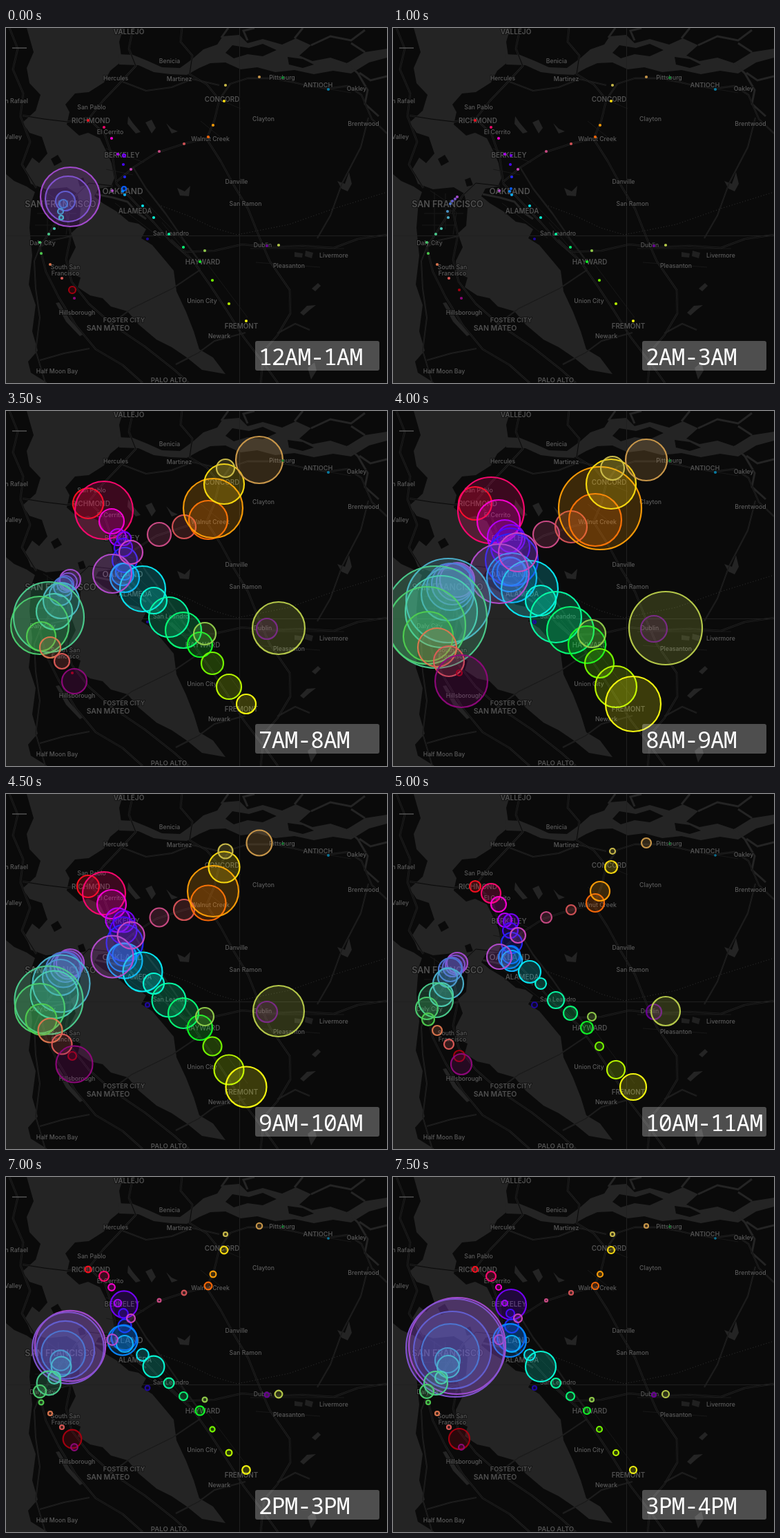
Recreate the animation shown at these times as an HTML page with a canvas. Size 552 by 515 pixels, loop 8 s.

```html
<!DOCTYPE html>
<html lang="en">
<head>
<meta charset="utf-8">
<title>Bay Area station activity by hour</title>
<style>
  html, body { margin: 0; width: 552px; height: 515px; overflow: hidden; background: #0a0a0a; }
  canvas { display: block; }
</style>
</head>
<body>
<canvas id="stage" width="552" height="515"></canvas>
<script>
const W = 552, H = 515, HOUR_MS = 500, HOURS = 16;
const LAND = '#0a0a0a', WATER = '#242424';
const ctx = document.getElementById('stage').getContext('2d');
const map = document.createElement('canvas');
map.width = W;
map.height = H;
const g = map.getContext('2d');

// ---- Base map ----
function fillArea(path, color) {
  g.fillStyle = color;
  g.fill(new Path2D(path));
}

function road(path, width = 2.6) {
  const p = new Path2D(path);
  g.lineJoin = 'round';
  g.strokeStyle = '#232323';
  g.lineWidth = width;
  g.stroke(p);
  g.strokeStyle = '#090909';
  g.lineWidth = width - 1.6;
  g.stroke(p);
}

function line(path, color, width = 1) {
  g.strokeStyle = color;
  g.lineWidth = width;
  g.stroke(new Path2D(path));
}

function place(name, x, y, size = 8.7) {
  const caps = name === name.toUpperCase();
  g.font = `${caps ? 600 : 500} ${size}px Inter, "Open Sans", sans-serif`;
  g.textAlign = 'center';
  g.textBaseline = 'middle';
  g.lineJoin = 'round';
  g.lineWidth = 2;
  g.strokeStyle = 'rgba(12,12,12,.65)';
  g.strokeText(name, x, y);
  g.fillStyle = caps ? '#505050' : '#5a5a5a';
  g.fillText(name, x, y);
}

function drawWater() {
  // ocean
  fillArea('M0 212L12 222L30 230L42 238L37 252L34 290L38 330L33 372L43 402L38 440L46 468L32 484L36 500L60 515H0Z', WATER);
  // San Pablo Bay, central and south bay
  fillArea('M30 0L40 35L30 58L34 80L50 97L43 120L24 137L34 152L52 158L60 182L48 196L38 188L28 205L36 226L58 234L88 231L103 240L108 262L106 287L94 298L101 318L91 338L92 356L108 362L104 376L122 388L140 392L152 404L176 411L192 430L218 452L240 463L262 478L284 496L318 502L300 478L280 466L272 440L261 412L247 382L243 352L228 334L212 315L196 305L203 292L192 284L178 281L160 266L140 254L128 244L134 233L152 230L157 218L153 196L146 180L136 160L119 152L106 156L88 140L92 122L86 111L100 95L120 93L142 79L151 62L168 48L164 20L170 0Z', WATER);
  // strait, Suisun Bay and delta
  fillArea('M162 38L184 39L206 48L226 57L252 58L270 45L286 31L306 24L314 12L338 10L350 22L372 16L400 24L420 15L442 25L425 40L444 48L470 43L494 51L520 35L552 30V43L526 50L500 66L474 62L446 67L418 61L390 64L364 57L340 60L318 50L296 51L280 58L262 68L238 67L214 64L192 54L164 53Z', WATER);
  fillArea('M328 25L352 29L372 23L392 32L372 41L350 38L330 44L318 36Z', LAND);
  fillArea('M408 42L430 45L446 53L430 58L410 53Z', LAND);
  line('M442 25L470 12L500 18L520 3M494 51L510 66L524 90L520 110L540 128M520 35L500 22M552 70L528 76L512 65M312 14L322 0M350 18L344 4L360 0M418 15L430 0', WATER, 3);
  // islands and harbour
  fillArea('M65 190L75 184L81 194L70 200Z', LAND);
  fillArea('M104 220L112 217L116 228L107 230Z', LAND);
  line('M130 241L155 246L176 252L190 268L203 277', WATER, 3);
  // lakes
  fillArea('M202 137L211 133L217 145L211 153Z', WATER);
  fillArea('M177 128L184 138L195 151L188 153L176 139Z', WATER);
  fillArea('M232 138L240 146L249 150L240 153Z', WATER);
  fillArea('M248 232L259 237L267 229L265 244L252 243Z', WATER);
  fillArea('M480 222L491 226L497 209L501 226L495 237L486 233Z', WATER);
  fillArea('M426 413L436 403L449 402L440 409L431 417Z', WATER);
  fillArea('M443 378L452 370L456 374L448 382Z', WATER);
  fillArea('M418 325L430 327L429 333L418 332ZM434 323L445 326L443 334L433 331Z', '#202020');
  fillArea('M72 399L77 398L92 422L111 445L107 447L87 426Z', WATER);
  fillArea('M437 493L447 485L450 497L442 510Z', WATER);
}

function drawRoads() {
  line('M54 236L75 250L92 268L87 300M48 251H100M45 269H102M42 286H92M60 238V300M76 240V292', '#191919');
  line('M145 175L200 195M145 205L184 213M158 254L224 305M188 238L260 312M226 282L282 350M290 340L350 420M300 100L340 117M282 135L320 166M396 76L500 94M354 320H490M362 340L455 347', '#181818');
  road('M5 0L17 30L10 60L25 95L21 128L35 165L23 198L44 232');
  road('M24 127L55 132L88 136L118 130L143 154L155 190L160 226L180 246L214 282L238 309L270 337L295 372L320 410L344 448L373 486L394 515');
  road('M184 0L178 30L188 55L163 82L141 105L121 130');
  road('M155 229L120 225L101 243L87 266L94 300L87 336L95 368L120 400L155 431L201 462L244 496L265 515');
  road('M84 264L66 292L49 318L58 354L76 390L101 431L130 466L169 489L198 515');
  road('M160 223L185 202L218 181L258 168L291 160L302 134L309 104L291 82L266 67L270 40L253 20L255 0');
  road('M290 160L311 193L330 228L351 263L368 306L382 338L411 380L412 414L393 446L374 468L369 515');
  road('M239 307L258 325L302 323L342 314L384 318L430 316L475 319L510 306L552 300');
  road('M309 104L325 81L350 73L393 73L430 82L466 88L495 84L515 97L530 132L552 153', 2.3);
  road('M169 78L203 91L240 86L270 74L309 83', 2.1);
  road('M184 202L203 233L231 269L260 311L278 335', 2.1);
  road('M95 302L66 308L49 318L41 338L43 378L49 420L43 468L57 515', 2);
  road('M49 482L84 472L121 465', 2);
  road('M281 351L241 378L182 407L146 434', 2);
  road('M347 442L302 454L279 471L246 488', 2);
  road('M393 443L419 429L440 438M451 305L470 272L487 225L514 173L525 130', 2);
  line('M0 301.5H552M338.5 0V515', '#202020');
  g.setLineDash([1, 3]);
  line('M225 258L263 272L301 290L335 300L410 285L478 261L552 238', '#333');
  g.setLineDash([]);
}

function drawPlaces() {
  place('VALLEJO', 178, 6, 10);
  place('Benicia', 237, 48);
  place('Hercules', 159, 73, 8.5);
  place('Martinez', 251, 74);
  place('Pittsburg', 400, 72);
  place('ANTIOCH', 452, 83, 9.2);
  place('Oakley', 508, 88);
  place('Brentwood', 518, 139);
  place('Clayton', 373, 132);
  place('CONCORD', 313, 104, 9.8);
  place('Walnut Creek', 296, 161);
  place('San Pablo', 124, 115);
  place('RICHMOND', 123, 135, 10);
  place('El Cerrito', 151, 151);
  place('BERKELEY', 168, 185, 10);
  place('OAKLAND', 169, 237, 12);
  place('SAN FRANCISCO', 79, 256, 12.5);
  place('ALAMEDA', 187, 266, 9.8);
  place('San Rafael', 10, 106);
  place('Mill Valley', 2, 158);
  place('Danville', 334, 223);
  place('San Ramon', 347, 255);
  place('San Leandro', 239, 298);
  place('Daly City', 53, 312);
  place('South San', 86, 347);
  place('Francisco', 86, 356);
  place('HAYWARD', 285, 340, 9.8);
  place('Dublin', 372, 315);
  place('Livermore', 475, 330);
  place('Pleasanton', 410, 345);
  place('Hillsborough', 103, 413);
  place('FOSTER CITY', 171, 424, 9.2);
  place('SAN MATEO', 148, 436, 10.5);
  place('Union City', 284, 396);
  place('FREMONT', 341, 433, 9.8);
  place('Newark', 309, 447);
  place('Half Moon Bay', 74, 498);
  place('PALO ALTO', 236, 511, 9.6);
}

g.fillStyle = LAND;
g.fillRect(0, 0, W, H);
drawWater();
drawRoads();
drawPlaces();
g.fillStyle = '#777';
g.fillRect(9, 28.5, 21, 1);

// ---- Stations: position, colour, radius at each key hour ----
const KEY_HOURS = [0, 5, 7, 8, 10, 12, 15];
const stops = [];
function stop(x, y, color, ...sizes) {
  stops.push({ x, y, color, sizes });
}

// Richmond branch
stop(119, 134, '#ff1020', 1, 4, 22, 24, 8, 5, 4);
stop(142, 144, '#ff0870', 1, 11, 42, 48, 14, 7, 7);
stop(153, 160, '#ff00d8', 1, 2.6, 18, 31, 11, 6, 4);
stop(162, 183, '#b800ff', 1, 2, 12, 25, 10, 7, 4);
stop(171, 185, '#7800ff', 2, 1, 10, 20, 11, 16, 22);
stop(170, 198, '#4a08ff', 1, 2, 13, 28, 11, 8, 6);
stop(172, 216, '#2428ff', 1, 3, 18, 38, 15, 9, 10);
// central Oakland and south
stop(171, 233, '#0860ff', 3, 3, 12, 20, 13, 16, 20);
stop(169, 237, '#0888ff', 1, 4, 16, 25, 16, 18, 24);
stop(172, 242, '#10b4ff', 1, 4, 21, 36, 15, 12, 12);
stop(198, 258, '#08ecf8', 1, 7, 33, 41, 16, 10, 8);
stop(214, 275, '#08ffdc', 1, 5, 19, 22, 8, 6, 22);
stop(236, 299, '#08ffa8', 1, 7, 29, 37, 12, 8, 7);
stop(257, 318, '#08ff78', 1, 5, 26, 34, 10, 6, 6);
stop(281, 339, '#10ff28', 1, 5, 18, 27, 9, 9, 5);
stop(299, 366, '#78ff00', 1, 4, 16, 21, 6, 3, 4);
stop(323, 400, '#c0ff00', 1, 3, 18, 30, 13, 5, 4);
stop(348, 425, '#fcff10', 1, 3, 14, 40, 19, 7, 5);
// east branch
stop(288, 323, '#94d04c', 1, 4, 16, 20, 6, 4, 3);
stop(378, 316, '#6c0098', 1, 3, 15, 19, 11, 4, 3);
stop(395, 315, '#bcd04c', 1, 10, 38, 53, 21, 6, 5);
stop(205, 306, '#2008a0', 1, 1, 1, 2, 4, 4, 3);
// hills branch
stop(181, 205, '#d048c0', 1, 2, 17, 28, 11, 6, 6);
stop(222, 179, '#d04c88', 1, 3, 17, 19, 8, 3, 2);
stop(258, 168, '#d85458', 1, 4, 17, 23, 7, 4, 3);
stop(293, 158, '#ff6c08', 1, 5, 28, 38, 13, 6, 5);
stop(300, 141, '#ffa008', 1, 7, 43, 60, 14, 5, 4);
stop(316, 106, '#ffe010', 1, 9, 29, 36, 9, 6, 5);
stop(318, 83, '#d0c04c', 1, 5, 13, 17, 4, 3, 3);
stop(367, 71, '#d09c4c', 1, 13, 34, 30, 7, 6, 3);
stop(401, 72, '#108830', 1, .6, .7, .8, .6, .7, .7);
stop(467, 89, '#0880a8', 1, .7, 1, 1, .7, .8, .7);
// San Francisco and the peninsula
stop(154, 236, '#b84cd0', 1, 7, 28, 43, 18, 9, 7);
stop(93, 245, '#a84cd4', 43, 2, 15, 25, 15, 24, 70);
stop(90, 248, '#8454d4', 33, 2, 13, 27, 14, 24, 71);
stop(86, 251, '#6460d4', 14, 2, 12, 30, 14, 22, 56);
stop(83, 255, '#4c78d4', 6, 3, 14, 34, 17, 17, 42);
stop(79, 266, '#4c98d0', 4, 4, 16, 38, 14, 10, 18);
stop(80, 275, '#4cb4d0', 3, 5, 26, 61, 22, 12, 16);
stop(70, 291, '#4cd0bc', 1, 4, 26, 52, 17, 9, 9);
stop(62, 299, '#4cd090', 1, 6, 51, 74, 25, 18, 17);
stop(49, 311, '#4cd070', 1, 6, 42, 56, 16, 8, 10);
stop(51, 327, '#50d050', 1, 4, 21, 36, 9, 4, 3);
stop(64, 343, '#e07850', 1, 3, 15, 28, 7, 3, 3);
stop(81, 363, '#e05c58', 1, 2, 11, 22, 7, 3, 3);
stop(96, 380, '#a80010', 5, 1, 1, 4, 8, 11, 15);
stop(99, 392, '#90087c', 1, 2, 18, 38, 15, 6, 4);

function radius(sizes, hour) {
  if (hour === 0) return sizes[0];
  if (hour === 1) return 1 + (sizes[0] - 1) * .13;
  if (hour < 4) return 1;
  if (hour === 4) return 1 + (sizes[1] - 1) * .25;
  const next = KEY_HOURS.findIndex(k => k >= hour);
  const from = KEY_HOURS[next - 1], to = KEY_HOURS[next];
  let f = (hour - from) / (to - from);
  if (to === 15) f = f ** 1.3;
  return sizes[next - 1] + (sizes[next] - sizes[next - 1]) * f;
}

function clock(hour) {
  return (hour % 12 || 12) + (hour % 24 < 12 ? 'AM' : 'PM');
}

function drawStop({ x, y, color, sizes }, hour) {
  ctx.beginPath();
  ctx.arc(x, y, radius(sizes, hour), 0, Math.PI * 2);
  ctx.fillStyle = ctx.strokeStyle = color;
  ctx.globalAlpha = .2;
  ctx.fill();
  ctx.globalAlpha = .95;
  ctx.lineWidth = 2.2;
  ctx.stroke();
  ctx.globalAlpha = 1;
}

function drawClock(hour) {
  ctx.fillStyle = 'rgba(255,255,255,.28)';
  ctx.beginPath();
  ctx.roundRect(361, 454, 180, 43, 3);
  ctx.fill();
  ctx.fillStyle = '#fff';
  ctx.font = '33px "Noto Sans Mono", "DejaVu Sans Mono", monospace';
  ctx.letterSpacing = '-1px';
  ctx.fillText(`${clock(hour)}-${clock(hour + 1)}`, 366, 489);
}

let shown = -1;
function frame() {
  const hour = Math.floor(performance.now() / HOUR_MS) % HOURS;
  if (hour !== shown) {
    shown = hour;
    ctx.drawImage(map, 0, 0);
    stops.forEach(s => drawStop(s, hour));
    drawClock(hour);
  }
  requestAnimationFrame(frame);
}
frame();
</script>
</body>
</html>
```
